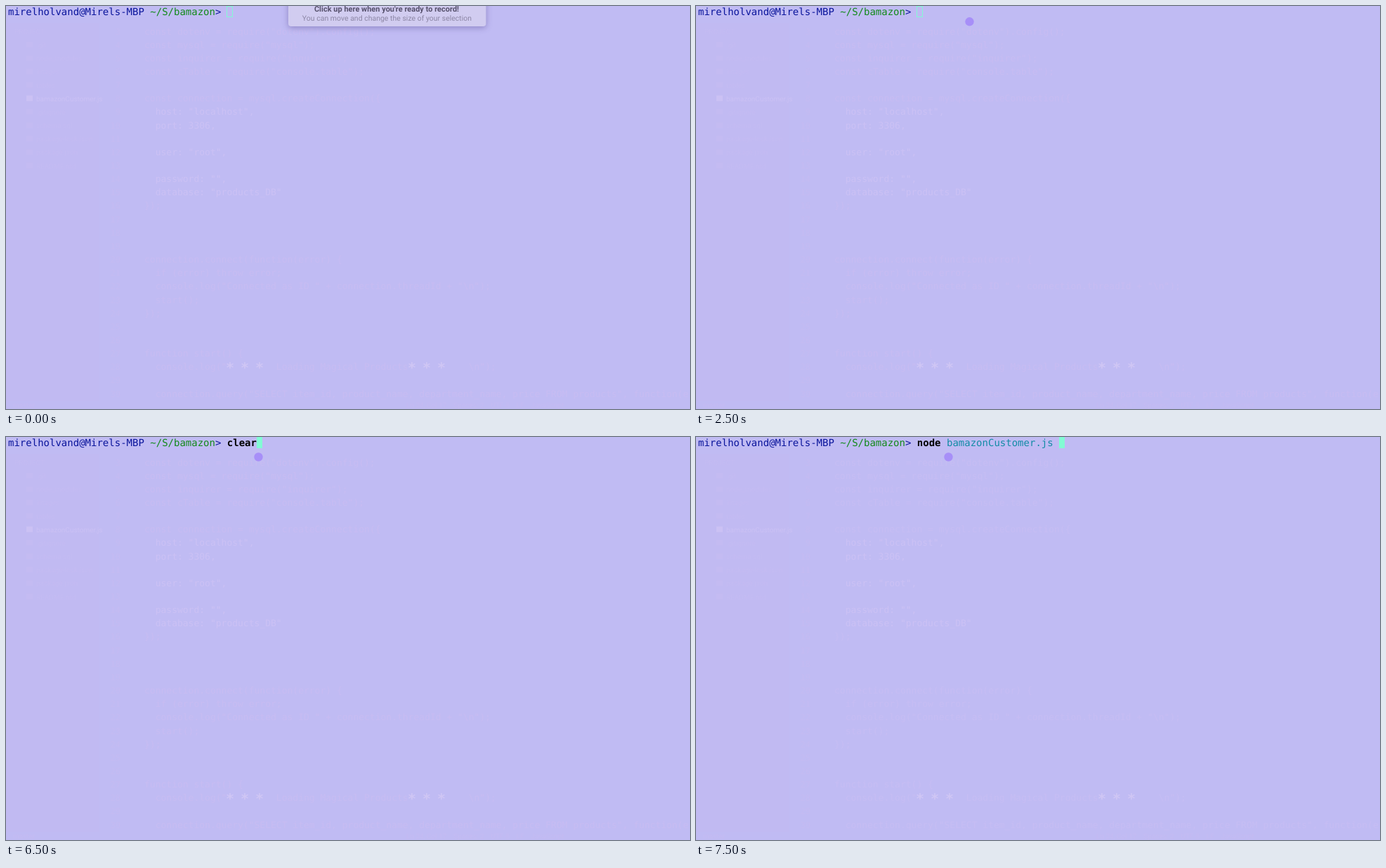
Recreate the animation shown at these times as an HTML page with a canvas. Size 974 by 575 pixels, loop 8000 ms.

```html
<!DOCTYPE html>
<html lang="en">
<head>
<meta charset="utf-8">
<style>
  html, body { margin: 0; width: 100%; height: 100%; overflow: hidden; background: #c0bbf3; }
  canvas { display: block; }
</style>
</head>
<body>
<canvas id="stage" width="974" height="575"></canvas>
<script>
const ctx = document.getElementById('stage').getContext('2d');
const LOOP = 8000, LINE = 19.15, CELL = 0.602, PROMPT_SIZE = 14;
const NAVY = '#0a159c', GREEN = '#128a1a', TEAL = '#128ca6', MINT = '#82fbd4';

const code = [
  'const dotenv = require("dotenv").config();',
  'const mysql = require("mysql");',
  'const inquirer = require("inquirer");',
  'const cTable = require("console.table");',
  '',
  'const connection = mysql.createConnection({',
  '  host: "localhost",',
  '  port: 3306,',
  '',
  '  user: "root",',
  '',
  '  password: "",',
  '  database: "products_DB"',
  '});',
  '', '', '',
  'connection.connect(function(error) {',
  '  if (error) throw error;',
  '  console.log("Connected as ID " + connection.threadId + "\\n");',
  '  start();',
  '});',
  '', '',
  'function start() {',
  '  console.log("         Loading Magical Products           \\n");',
  '',
  '  connection.query("SELECT item_id, product_name, department_name, price FROM products", function(err, res) {'
];
const files = ['PROJECT', '.git', 'node_modules', 'images', 'tables', 'bamazonCustomer.js',
  '.gitignore', 'schema.sql', 'package-lock.json', 'package.json', 'README.md'];

// Pointer: start time, x, y
const pointer = [
  [2500, 389.5, 22.3], [2750, 351.5, 20.5], [3000, 316.3, 8.5],
  [3250, 316.3, 10.5], [3500, 311.5, 27.5], [4000, -20, -20], [4250, 359.5, 28.5]
];

function text(str, x, y, font, color, align = 'left') {
  ctx.font = font;
  ctx.fillStyle = color;
  ctx.textAlign = align;
  ctx.fillText(str, x, y);
}

// Sets text on a character grid and returns the x after it.
function mono(str, x, y, size, color, weight = '') {
  const cell = size * CELL;
  [...str].forEach((c, i) => {
    if (c !== ' ') text(c, x + i * cell, y, `${weight} ${size}px "DejaVu Sans Mono", monospace`, color);
  });
  return x + str.length * cell;
}

function drawEditor(t) {
  const late = t >= 7500;
  const ink = late ? '#c6bdf3' : '#c7bcf2';
  const bright = '#cbc1f4', dim = '#c4bbf2';
  ctx.fillStyle = '#c0bbf3';
  ctx.fillRect(0, 0, 974, 575);
  ctx.fillStyle = '#c1baf2';
  ctx.fillRect(0, 24, 133, 540);

  code.forEach((line, i) => {
    const y = 40.5 + i * LINE;
    mono(line, 197, y, 13, /^  (host|port|user|pass|data)/.test(line) ? bright : ink);
    text(i + 3, 163, y, '12px "DejaVu Sans Mono", monospace', dim, 'right');
  });
  for (const x of [319, 340, 361, 578, 599, 620])
    text('*', x, 523, 'bold 20px "DejaVu Sans Mono", monospace', '#cfc6f4', 'center');

  files.forEach((name, i) => {
    const y = 40 + i * LINE;
    text(name, i ? 43 : 12, y, '10px Roboto, sans-serif', i === 5 ? bright : dim);
    if (i) {
      ctx.fillStyle = i === 5 ? bright : dim;
      ctx.fillRect(29, y - 8, 9, 8);
    }
  });
  text('master', 10, 573, '10px Roboto, sans-serif', dim);
  text('Ln 24, Col 17    Spaces: 2    UTF-8    LF    JavaScript', 570, 573, '10px Roboto, sans-serif', dim);
}

function drawPrompt(t) {
  let x = mono('mirelholvand@Mirels-MBP ', 3, 13, PROMPT_SIZE, NAVY);
  x = mono('~/S/bamazon', x, 13, PROMPT_SIZE, GREEN);
  x = mono('> ', x, 13, PROMPT_SIZE, NAVY);
  if (t >= 7250) {
    x = mono('node ', x, 13, PROMPT_SIZE, '#000', 'bold');
    x = mono('bamazonCustomer.js ', x, 13, PROMPT_SIZE, TEAL);
  } else if (t >= 6500) {
    x = mono('clear', x, 13, PROMPT_SIZE, '#000', 'bold');
  }
  x = Math.round(x);
  if (t >= 3500) {
    ctx.fillStyle = MINT;
    ctx.fillRect(x, 0, 8, 16);
  } else {
    ctx.strokeStyle = MINT;
    ctx.lineWidth = 1;
    ctx.strokeRect(x - 0.5, 0.5, 8, 15);
  }
}

function drawHint() {
  ctx.save();
  ctx.shadowColor = 'rgba(70, 55, 130, .4)';
  ctx.shadowBlur = 9;
  ctx.shadowOffsetY = 2;
  ctx.fillStyle = '#d1ccf0';
  ctx.beginPath();
  ctx.roundRect(402, -10, 281.5, 39, 4);
  ctx.fill();
  ctx.restore();
  text("Click up here when you're ready to record!", 542, 8, 'bold 11px Roboto, sans-serif', '#57516d', 'center');
  text('You can move and change the size of your selection', 542.5, 21, '10.5px Roboto, sans-serif', '#8d87a6', 'center');
}

function drawPointer(t) {
  const spot = pointer.filter(p => t >= p[0]).pop();
  if (!spot) return;
  ctx.fillStyle = '#a78ff8';
  ctx.beginPath();
  ctx.arc(spot[1], spot[2], 6.2, 0, 2 * Math.PI);
  ctx.fill();
}

const start = performance.now();
function frame() {
  const t = (performance.now() - start) % LOOP;
  ctx.textRendering = 'geometricPrecision';
  drawEditor(t);
  drawPrompt(t);
  if (t < 250) drawHint();
  drawPointer(t);
  requestAnimationFrame(frame);
}
frame();
</script>
</body>
</html>
```
